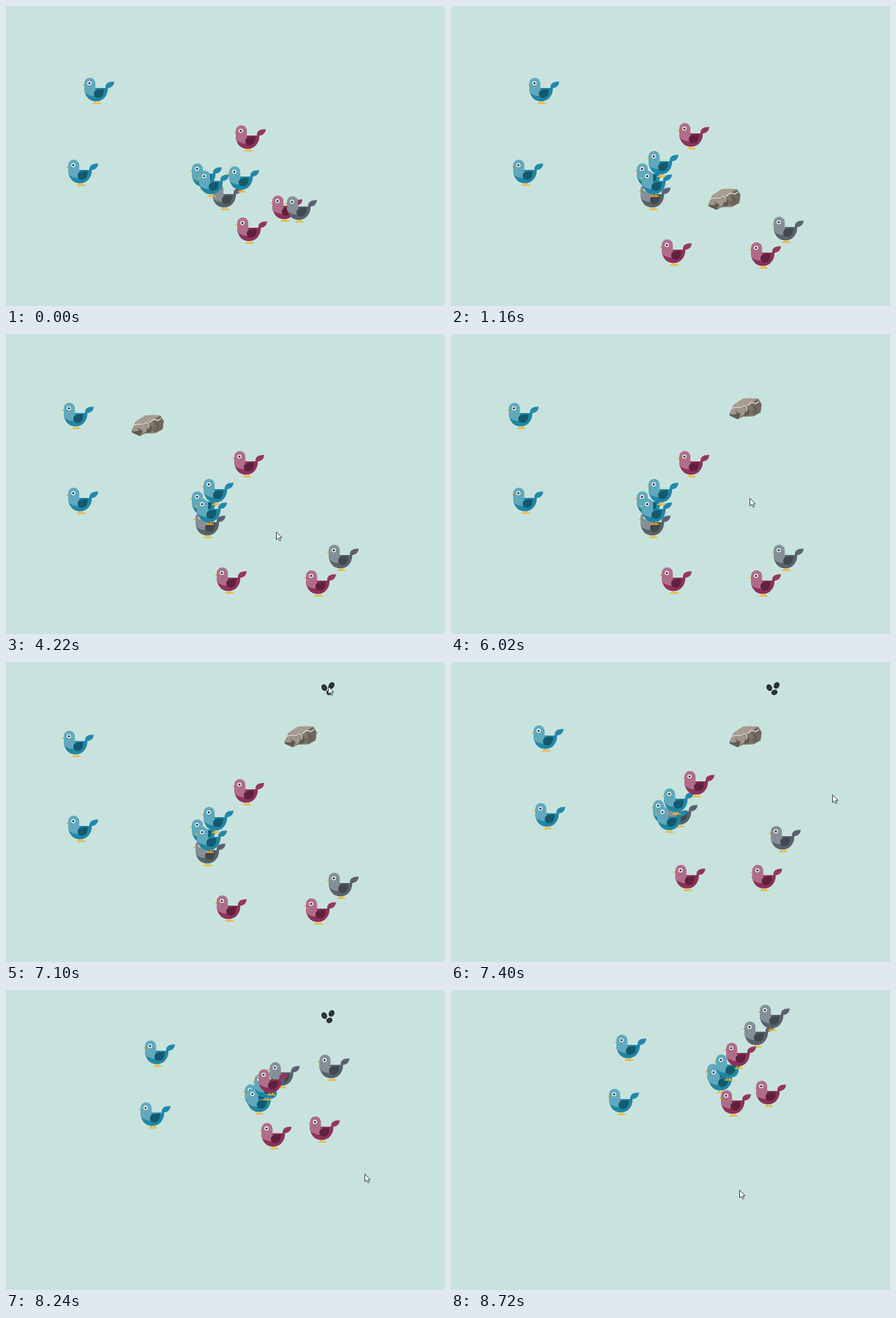
An HTML page for the animation above (8.78 s loop, 600 by 410 pixels).

```html
<!DOCTYPE html>
<html lang="en">
<head>
<meta charset="utf-8">
<title>Flock</title>
<style>
  html, body { margin: 0; width: 100%; height: 100%; overflow: hidden; background: #c8e3de; }
  svg { display: block; width: 600px; height: 410px; }
  .blue { --light: #60a9bd; --main: #2186a4; --dark: #14596e; --tail: #2388a9; }
  .pink { --light: #b06d89; --main: #8d3158; --dark: #5f213f; --tail: #93375f; }
  .gray { --light: #868f97; --main: #59616b; --dark: #41484f; --tail: #5e6072; }
</style>
</head>
<body>
<svg id="stage" viewBox="0 0 600 410">
  <defs>
    <g id="bird">
      <path d="M18 31.5V35M22 31.5V35M14.5 35H20M19.5 35H26" stroke="#f0b429" stroke-width="1.5" fill="none"/>
      <path d="M32 14.5C31.5 8 35 5.2 44 5.2C43.5 11 40 14 34.500 14L33 16Z" fill="var(--tail)"/>
      <path d="M4 8L0 10.500L4.500 12Z" fill="#e6b52c"/>
      <path d="M3 14H35.300C35.300 25 28.500 32.300 19 32.300S3 25 3 14Z" fill="var(--main)"/>
      <path d="M3 19V7.700A7.600 7.700 0 0 1 18.200 7.700V25C11 25 6 23 3 19Z" fill="var(--light)"/>
      <path d="M16 22C16 17.500 19 15.700 29.500 15.700C30 22.500 27.500 27.500 22 27.500C18.500 27.500 16 25.500 16 22Z" fill="var(--dark)"/>
      <circle cx="10" cy="7.500" r="2.800" fill="#fff"/>
      <circle cx="10" cy="7.500" r="1.500" fill="#1d3440"/>
    </g>
    <g id="stone">
      <path d="M.5 23L6 10L19 1.500L30 .7L40 1.500L44.500 9L43 20L33 25.500L19 26L12 29.500L2 25Z" fill="#81786c"/>
      <path d="M6 10L19 1.500L30 .7L40 1.500L30 7L25 12L18 11L5 13Z" fill="#a69d90"/>
      <path d="M4 14L15 12L22 14L24 20L19 24L12 28L2 24Z" fill="#a0978a"/>
      <path d="M30 7L40 2L44.500 9L43 20L34 25L28 21L33 16Z" fill="#70675c"/>
      <path d="M13 20L16 23L12 29.500L2 25L.5 23L8 23ZM24 14L29 17L27 24L20 25Z" fill="#625a50"/>
      <path d="M3 15C9 11 15 15 19 12S25 15 24 19M25 11L31 6.500L37 8L41 5" fill="none" stroke="#dedad1" stroke-width="1.300"/>
      <path d="M34 12L37 16L36 21M9 18L11 21" fill="none" stroke="#514a42"/>
    </g>
    <g id="seed">
      <ellipse rx="3.700" ry="4.700" fill="#23282a"/>
      <path d="M-1 -3L-1.500 2M1.500 -2L1 3" stroke="#4d5557" stroke-width=".7"/>
    </g>
  </defs>
  <g id="flock"></g>
  <use id="rock" href="#stone"/>
  <g id="food">
    <use href="#seed" transform="translate(435 35) rotate(-25)"/>
    <use href="#seed" transform="translate(445 32) rotate(30)"/>
    <use href="#seed" transform="translate(442 41.500) rotate(60) scale(.9)"/>
  </g>
  <path id="cursor" d="M.5.5V11L3 8.800L4.800 12.500L6.500 11.700L4.800 8.200H8Z" fill="#fff" stroke="#30363a" stroke-width=".9"/>
</svg>
<script>
const LOOP = 8780, STEP = 60, FIRST = 20;
const FEAST = [7100, 7400, 7820, 8720];
const PACE = [0, .23, .54, 1];

// home: start, safe: after the scare, meal: last place, via: detour on the way
const birds = [
  { kind: 'blue', home: [104, 98], safe: [76, 94], meal: [223, 61], scare: 3200 },
  { kind: 'blue', home: [82, 210], safe: [82, 210], meal: [213, 135] },
  { kind: 'blue', home: [251, 215], safe: [251, 215], meal: [347, 101] },
  { kind: 'gray', home: [279, 243], safe: [256, 243], meal: [398, 43], via: [[293, 190], [322, 147]] },
  { kind: 'blue', home: [261, 225], safe: [258, 225], meal: [349, 105] },
  { kind: 'blue', home: [302, 219], safe: [267, 198], meal: [359, 88] },
  { kind: 'pink', home: [313, 289], safe: [285, 319], meal: [366, 137] },
  { kind: 'pink', home: [361, 259], safe: [407, 323], meal: [414, 124] },
  { kind: 'gray', home: [381, 260], safe: [438, 288], meal: [419, 20], via: [[434, 224], [431, 148]] },
  { kind: 'pink', home: [311, 163], safe: [309, 160], meal: [373, 72], via: [[316, 149], [315, 140]] }
];

const rocks = [[500, 351, 249], [3200, 171, 110], [6020, 380, 87]];
const ROCK_LIFE = 1800;
const foodTime = [7100, 8600];

const trail = [
  [3860, 529, 371], [4220, 369, 270], [4700, 257, 110], [5000, 300, 69],
  [5600, 408, 218], [5840, 408, 224], [6020, 408, 224], [6400, 292, 150],
  [6860, 440, 33], [7100, 440, 33], [7400, 521, 181], [7820, 538, 235],
  [8000, 538, 240], [8720, 394, 273]
];

const el = id => document.getElementById(id);
const clamp = v => Math.max(0, Math.min(1, v));
const mix = (a, b, p) => a.map((v, i) => v + (b[i] - v) * p);
const place = (node, [x, y]) => node.setAttribute('transform', `translate(${x} ${y})`);
const show = (node, on) => node.setAttribute('visibility', on ? 'visible' : 'hidden');

function along(times, points, t) {
  let i = 0;
  while (i < times.length - 2 && t >= times[i + 1]) i++;
  return mix(points[i], points[i + 1], clamp((t - times[i]) / (times[i + 1] - times[i])));
}

for (const b of birds) {
  b.node = document.createElementNS('http://www.w3.org/2000/svg', 'use');
  b.node.setAttribute('href', '#bird');
  b.node.setAttribute('class', b.kind);
  el('flock').append(b.node);
  const dist = Math.hypot(b.safe[0] - b.home[0], b.safe[1] - b.home[1]);
  b.flight = 660 * Math.pow(dist / 79, .7) || 1;
  b.path = b.via ? [b.safe, ...b.via, b.meal] : PACE.map(p => mix(b.safe, b.meal, p));
}

function birdAt(b, t) {
  if (t >= FEAST[0]) return along(FEAST, b.path, t);
  const u = clamp((t - (b.scare || 500)) / b.flight);
  return mix(b.home, b.safe, u * (1.3 - .3 * u));
}

const trailTimes = trail.map(p => p[0]);
const trailPoints = trail.map(p => p.slice(1));

function draw(t) {
  for (const b of birds) place(b.node, birdAt(b, t));
  const rock = rocks.find(r => t >= r[0] && t < r[0] + ROCK_LIFE);
  show(el('rock'), rock);
  if (rock) place(el('rock'), rock.slice(1));
  show(el('food'), t >= foodTime[0] && t < foodTime[1]);
  show(el('cursor'), t >= trailTimes[0]);
  place(el('cursor'), along(trailTimes, trailPoints, t));
}

const start = performance.now();
function tick() {
  const t = (performance.now() - start) % LOOP;
  draw(Math.max(0, Math.floor((t - FIRST) / STEP) * STEP + FIRST));
  requestAnimationFrame(tick);
}
tick();
</script>
</body>
</html>
```
